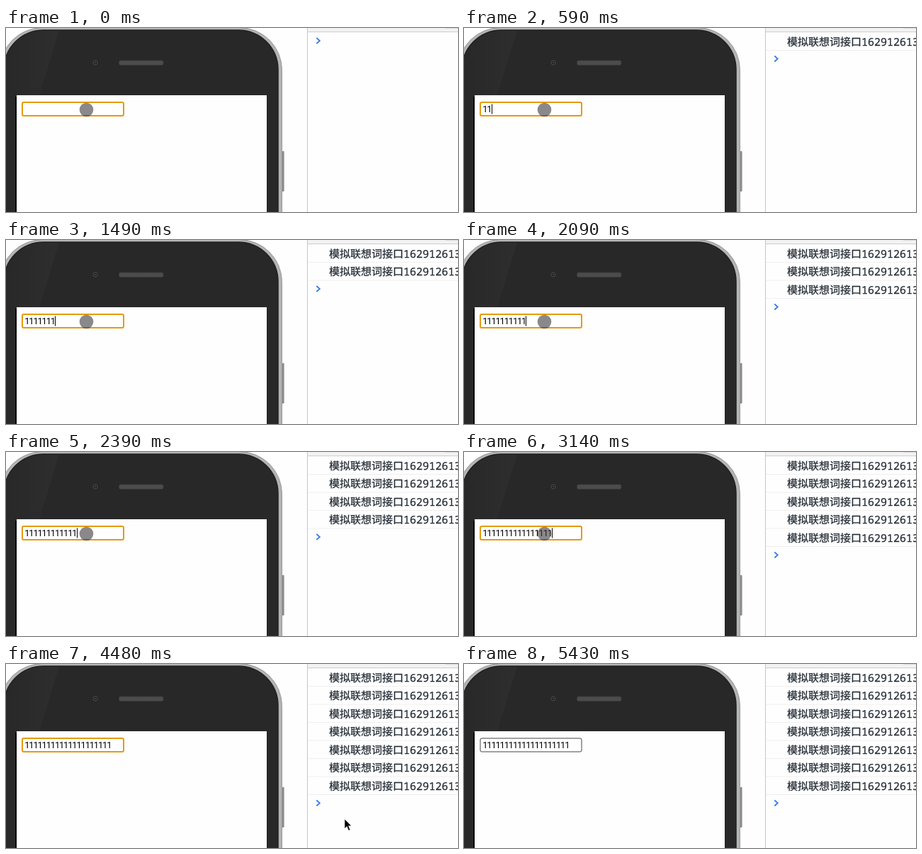
An HTML page for the animation above (5.53 s loop, 638 by 260 pixels).

```html
<!DOCTYPE html>
<html lang="zh-CN">
<head>
<meta charset="utf-8">
<title>Throttled input</title>
<style>
html, body { margin: 0; height: 100%; overflow: hidden; background: #fefefe; }
svg { display: block; width: 100vw; height: 100vh; }
text { white-space: pre; text-rendering: geometricPrecision; }
#typed { font: 12.8px Roboto, Arial, sans-serif; letter-spacing: -.085em; }
.log text {
  font: 15px "Noto Sans Mono", "Noto Sans CJK SC", "Noto Sans CJK", monospace;
  fill: #222a33; stroke: #222a33; stroke-width: .25px;
}
</style>
</head>
<body>
<svg viewBox="0 0 638 260">
  <defs>
    <linearGradient id="gloss" x2="1" y2="0">
      <stop offset="0" stop-color="#282828"/>
      <stop offset="1" stop-color="#2e2e2e"/>
    </linearGradient>
    <pattern id="mesh" width="3" height="3" patternUnits="userSpaceOnUse">
      <path d="M0 0h3v3h-3z" fill="#434343"/>
      <path d="M0 0h1.5v1.5h-1.5zM1.5 1.5h1.5v1.5h-1.5z" fill="#555"/>
    </pattern>
    <clipPath id="body"><rect x="-3" y="3" width="387" height="400" rx="56"/></clipPath>
  </defs>

  <!-- Phone -->
  <rect x="388" y="174" width="4.6" height="57" rx="1" fill="#8b8b8b"/>
  <rect x="-8.5" y="-.5" width="398" height="410" rx="60" fill="#b3b4b4" stroke="#999"/>
  <g clip-path="url(#body)">
    <rect x="-3" y="3" width="387" height="400" fill="#282828"/>
    <path d="M-3 0H76L47 95V260H-3z" fill="url(#gloss)"/>
  </g>
  <rect x="-3" y="3" width="387" height="400" rx="56" fill="none" stroke="#202020" stroke-width="1.5"/>
  <circle cx="126" cy="49" r="3" fill="#1b1b1b" stroke="#505050"/>
  <circle cx="126" cy="49" r="1" fill="#5a5a5a"/>
  <rect x="159.5" y="46" width="62.5" height="6.5" rx="2" fill="url(#mesh)" stroke="#3a3a3a" stroke-width=".7"/>
  <path d="M13 97h3v163h-3z" fill="#000"/>
  <path d="M15 95h353v165H15z" fill="#fefefe"/>

  <!-- Input -->
  <rect id="field" x="23" y="105" width="143" height="19" rx="2" fill="#fff"/>
  <text id="typed" x="26.2" y="119"></text>
  <path id="caret" stroke="#000"/>

  <!-- Console -->
  <path d="M426 0h212v5H426z" fill="#f3f3f3"/>
  <path d="M620 .5h18" stroke="#ddd"/>
  <path d="M426 5.5h212" stroke="#ccc"/>
  <path d="M425.5 0v260" stroke="#c6c6c6"/>
  <g id="logs"></g>
  <path id="prompt" d="M438.3 -4L442.8 0L438.3 4" fill="none" stroke="#367cf1" stroke-width="1.8"/>

  <!-- Pointers -->
  <circle id="touch" r="9.8" fill="#3c383a" fill-opacity=".6"/>
  <path id="arrow" d="M0 0V15L3.4 11.8L5.8 17.4L8.5 16.2L6.2 10.7H10.8z" stroke="#fff" stroke-width="1.1"/>
</svg>
<script>
const LOOP = 5530, ROW = 25.5;
const keyTimes = [440, 590, 740, 1040, 1190, 1340, 1490, 1640, 1940, 2090,
  2240, 2390, 2690, 2840, 2990, 3140, 3290, 3590, 3740, 3890];
const logTimes = [440, 1040, 1640, 2240, 2840, 3290, 3890];
// time, shape, x, y
const moves = [
  [0, 'touch', 113.5, 115.5], [4040, 'touch', 150, 126], [4190, 'touch', 262, 160],
  [4340, 'arrow', 424, 206], [4480, 'arrow', 477.7, 218.3], [4630, 'arrow', 497, 238],
  [4770, 'arrow', 560, 246], [4920, 'arrow', 607, 253], [5070, 'none', 0, 0]
];

const $ = id => document.getElementById(id);
const show = (el, on) => el.setAttribute('visibility', on ? 'visible' : 'hidden');
const set = (el, attrs) => { for (const k in attrs) el.setAttribute(k, attrs[k]); };
const passed = (times, t) => times.filter(x => x <= t).length;

$('logs').innerHTML = logTimes.map((time, i) => `<g class="log">
  <text x="456" y="${25 + Math.floor(i * ROW)}">模拟联想词接口${1629126130000 + time}</text>
  <path d="M426 ${31.5 + i * ROW}h212" stroke="#efefef"/></g>`).join('');
const rows = [...$('logs').children];

function draw(t) {
  const focused = t < 5430;
  set($('field'), focused
    ? { stroke: '#e59a10', 'stroke-width': 2 }
    : { stroke: '#444', 'stroke-width': 1 });

  const typed = $('typed');
  typed.textContent = '1'.repeat(passed(keyTimes, t));
  const end = typed.textContent ? typed.getComputedTextLength() : 0;
  set($('caret'), { d: `M${Math.floor(26.8 + end) + .5} 107.5v14` });
  show($('caret'), focused && t >= 290 && (t < 4480 || t >= 4920));

  const count = passed(logTimes, t);
  rows.forEach((row, i) => show(row, i < count));
  set($('prompt'), { transform: `translate(0 ${18 + count * ROW})` });

  const [, shape, x, y] = moves.findLast(m => m[0] <= t);
  for (const id of ['touch', 'arrow']) {
    show($(id), id === shape);
    set($(id), { transform: `translate(${x} ${y})` });
  }
}

const start = performance.now();
function frame() {
  draw((performance.now() - start) % LOOP);
  requestAnimationFrame(frame);
}
frame();
</script>
</body>
</html>
```
